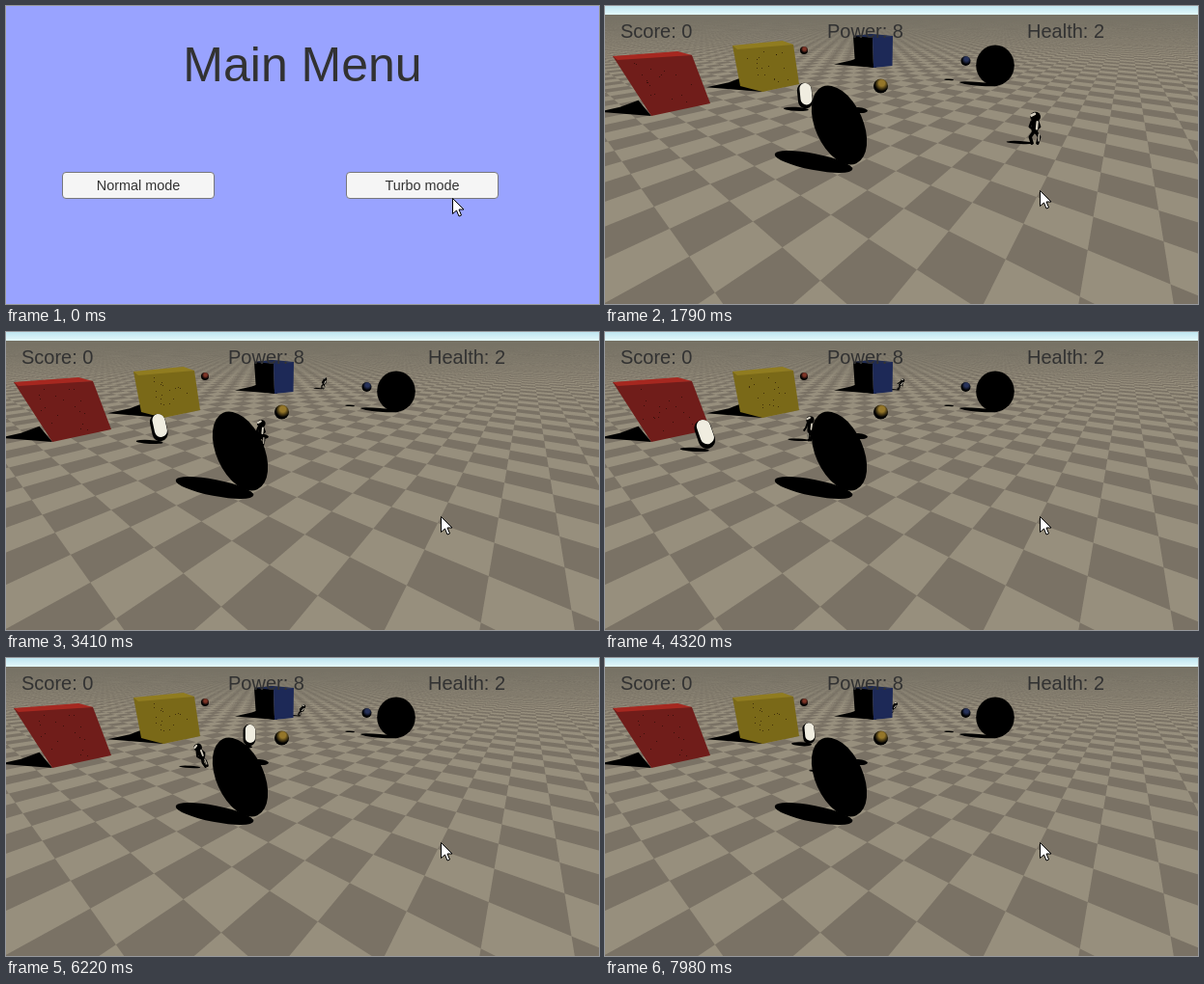
Animation of 614x309 px, one loop 8000 ms. Source, as an HTML page with a canvas:

```html
<!DOCTYPE html>
<html lang="en">
<head>
<meta charset="utf-8">
<title>Turbo mode</title>
<style>
  html, body { margin: 0; width: 100%; height: 100%; overflow: hidden; background: #99a3ff; }
  canvas { display: block; }
</style>
</head>
<body>
<canvas id="stage" width="614" height="309"></canvas>
<script>
const W = 614, H = 309, LOOP = 8000, GAME_START = 1298, STEP = 70.36, HORIZON = 10;
const ctx = document.getElementById('stage').getContext('2d');

const clamp01 = v => Math.min(1, Math.max(0, v));
const progress = (t, from, to) => clamp01((t - from) / (to - from));
const mix = (a, b, k) => a + (b - a) * k;

// Position on a path of [time, x, y] waypoints.
function along(path, t) {
  const next = Math.max(1, path.findIndex(p => p[0] > t));
  const i = t >= path[path.length - 1][0] ? path.length - 1 : next;
  const [t0, x0, y0] = path[i - 1], [t1, x1, y1] = path[i];
  const k = progress(t, t0, t1);
  return [mix(x0, x1, k), mix(y0, y1, k)];
}

function random(seed) {
  return () => (seed = (seed * 16807) % 2147483647) / 2147483647;
}

function text(string, x, y, size, align = 'left') {
  ctx.font = `${size}px "Liberation Sans", Arial, sans-serif`;
  ctx.textAlign = align;
  ctx.fillStyle = '#323232';
  ctx.fillText(string, x, y);
}

function poly(color, ...points) {
  ctx.beginPath();
  points.forEach(p => ctx.lineTo(...p));
  ctx.closePath();
  ctx.fillStyle = color;
  ctx.fill();
}

function oval(x, y, rx, ry, degrees = 0, color = '#000') {
  ctx.beginPath();
  ctx.ellipse(x, y, rx, ry, degrees * Math.PI / 180, 0, 2 * Math.PI);
  ctx.fillStyle = color;
  ctx.fill();
}

function pill(x, y, w, h, color) {
  ctx.beginPath();
  ctx.roundRect(x, y, w, h, w / 2);
  ctx.fillStyle = color;
  ctx.fill();
}

// ---- Menu ----

function button(label, x, shade) {
  ctx.beginPath();
  ctx.roundRect(x + .5, 172.5, 157, 27, 3.5);
  ctx.fillStyle = `rgb(${shade},${shade},${shade})`;
  ctx.fill();
  ctx.lineWidth = 1;
  ctx.strokeStyle = '#77777c';
  ctx.stroke();
  text(label, x + 79, 191, 14.4, 'center');
}

function drawMenu(t) {
  ctx.fillStyle = '#99a3ff';
  ctx.fillRect(0, 0, W, H);
  text('Main Menu', 307, 78, 50, 'center');
  button('Normal mode', 58, 245);
  button('Turbo mode', 352, mix(245, 214, progress(t, 830, 1170)));
}

function drawCursor(t) {
  const k = progress(Math.floor(t / 70) * 70, 0, 340);
  ctx.save();
  ctx.translate(Math.round(mix(462, 450, k)) + .5, Math.round(mix(199, 191, k)) + .5);
  ctx.lineWidth = 1;
  ctx.strokeStyle = '#000';
  poly('#fff', [0, 0], [0, 16], [4, 12.5], [6.5, 18.5], [9, 17.5], [6.5, 11.5], [11.5, 11.5]);
  ctx.stroke();
  ctx.restore();
}

// ---- Floor: a checkerboard seen through a tilted camera ----

function makeFloor() {
  const layer = document.createElement('canvas');
  layer.width = W;
  layer.height = H;
  const c = layer.getContext('2d'), image = c.createImageData(W, H);
  const focal = 268, cos = .881, sin = .473, tile = .2965, u0 = .36, v0 = -1.011, grid = 4;
  const light = [151, 143, 125], dark = [122, 114, 101], far = [119, 114, 101];
  for (let y = 9; y < H; y++) {
    const near = clamp01((y - 12) / 40);
    for (let x = 0; x < W; x++) {
      let lit = 0;
      for (let s = 0; s < grid * grid; s++) {
        const px = x + (s % grid + .5) / grid;
        const py = Math.max(y + (Math.floor(s / grid) + .5) / grid, HORIZON + .4);
        const drop = cos * (py - HORIZON);
        const gx = (px - W / 2) / drop, gz = (focal * cos - (py - H / 2) * sin) / drop;
        const u = Math.floor((gx * .609 + gz * .793 - u0) / tile);
        const v = Math.floor((gx * .793 - gz * .609 - v0) / tile);
        if ((u + v) % 2 === 0) lit++;
      }
      const i = (y * W + x) * 4;
      for (let k = 0; k < 3; k++) {
        image.data[i + k] = mix(far[k], mix(dark[k], light[k], lit / grid ** 2), near);
      }
      image.data[i + 3] = 255;
    }
  }
  c.putImageData(image, 0, 0);
  const sky = c.createLinearGradient(0, 0, 0, 9);
  sky.addColorStop(0, '#bfe6f0');
  sky.addColorStop(1, '#e4f8fb');
  c.fillStyle = sky;
  c.fillRect(0, 0, W, 9);
  return layer;
}
const floor = makeFloor();

// ---- Scene objects ----

function ball(x, y, r, color) {
  const glow = ctx.createRadialGradient(x + r * .15, y - r * .4, r * .4, x + r * .15, y - r * .3, r);
  glow.addColorStop(0, color);
  glow.addColorStop(1, '#000');
  oval(x, y, r, r, 0, glow);
}

// Shadow thrown to the left of a cube's nearest bottom corner.
function cubeShadow(x, y, reach) {
  poly('#000', [x, y], [x - reach, y - reach * .08], [x - reach * .6, y - reach * .17],
    [x - reach * .25, y - reach * .3]);
}

function cubeRoof(color, [x0, y0], [x1, y1]) {
  poly(color, [x0, y0], [mix(x0, x1, .82), y1 - 4], [x1, y1], [x0 + 5, y0 + 4]);
}

function specks(seed, x, y, size) {
  const rnd = random(seed);
  ctx.fillStyle = 'rgba(20,5,0,.55)';
  for (let i = 0; i < 18; i++) {
    const down = rnd();
    ctx.fillRect(Math.round(x + (rnd() + down * .4) * size), Math.round(y + down * size * .8), 1, 1);
  }
}

function cubes(frame) {
  cubeShadow(48, 114, 54);
  poly('#701d1a', [8, 52], [90, 51], [109, 101], [48, 114]);
  cubeRoof('#a62820', [8, 52], [90, 51]);
  specks(90 + frame % 5, 24, 59, 55);

  cubeShadow(163, 89, 58);
  poly('#7a6918', [132, 41], [195, 40], [201, 81], [163, 89], [140, 83]);
  cubeRoof('#907c20', [132, 41], [195, 40]);
  specks(40 + frame % 5, 143, 47, 40);

  cubeShadow(281, 64, 44);
  poly('#000', [257, 31], [277, 29], [278, 64], [259, 61]);
  poly('#1d2957', [277, 32], [298, 31], [297.5, 62], [278, 64]);
  poly('#202c52', [257, 31], [277, 29], [298, 31], [277, 33]);
}

function capsule(t) {
  const out = progress(t, 1790, 4320) ** 1.7;
  const [x, y] = t < 4320
    ? [mix(207, 103, out), mix(93, 106, out)]
    : along([[4320, 103, 106], [6220, 252, 80], [7980, 211, 78]], t);
  const h = (y - HORIZON) * .32, w = h * .57;
  oval(x - w * .6, y + h * .52, w * .85, 2, 3);
  ctx.save();
  ctx.translate(x, y);
  ctx.rotate((x - 252) * .13 * Math.PI / 180);
  pill(-w / 2, -h / 2, w, h, '#000');
  ctx.clip();
  pill(-w * .32, -h * .5, w * .8, h * .86, '#f0ede0');
  ctx.restore();
}

function walker(path, lean, t) {
  const [x, y] = along(path, t);
  const size = (y - HORIZON) * .29, swing = Math.sin(t / 110) * .13;
  oval(x - size * .45, y + size * .45, size * .42, size * .045, 3);
  ctx.save();
  ctx.translate(x, y);
  ctx.scale(size, size);
  ctx.rotate(lean * Math.PI / 180);
  ctx.lineCap = ctx.lineJoin = 'round';
  const limb = (color, width, ...points) => {
    ctx.beginPath();
    points.forEach(p => ctx.lineTo(...p));
    ctx.strokeStyle = color;
    ctx.lineWidth = width;
    ctx.stroke();
  };
  for (const side of [-1, 1]) {
    const stride = side * (.07 - swing);
    limb('#000', .1, [0, .08], [stride, .28], [stride * .6, .47]);
    limb('#000', .08, [side * .09, -.2], [side * .15, -.03], [side * (.09 + swing), .07]);
  }
  limb('#000', .2, [.01, -.18], [0, .08]);
  oval(.02, -.34, .16, .15);
  limb('#d2ccbd', .08, [-.1, -.38], [0, -.43]);
  limb('#d2ccbd', .07, [.08, -.18], [.06, .03]);
  limb('#aaa394', .05, [.06 - swing, .2], [.05 - swing, .4]);
  ctx.restore();
}

const walkerPath = [[1300, 525, 137], [2630, 308, 108], [4320, 212, 100], [6220, 202, 101], [7400, 235, 105]];
const farWalkerPath = [[1790, 404, 57], [2630, 349, 52], [4320, 306, 54], [6220, 306, 54], [7980, 299, 51]];

function drawGame(time) {
  const frame = Math.floor((time - GAME_START) / STEP + .1);
  const t = GAME_START + frame * STEP;
  ctx.drawImage(floor, 0, 0);

  ball(206, 46, 4, '#7d3426');
  walker(farWalkerPath, 28 * progress(t, 2630, 4320), t);
  cubes(frame);
  oval(356, 76.3, 5, .8, 4);
  oval(387, 80.8, 20, 1.9, 5);
  ball(373.5, 57, 5, '#27325a');
  oval(404, 61.5, 19.8, 21);

  oval(262, 108, 10, 3, 5);
  ball(285.5, 83, 7.5, '#94762a');
  capsule(t);
  walker(walkerPath, -26 * progress(t, 4320, 5000), t);

  oval(216, 161.5, 41, 8.5, 11);
  oval(242.5, 123.5, 43.5, 24.7, 66);

  text('Score: 0', 16, 33, 20);
  text('Power: 8', 230, 33, 20);
  text('Health: 2', 437, 33, 20);
}

function draw(ms) {
  const t = ms % LOOP;
  if (t < GAME_START) drawMenu(t);
  else drawGame(t);
  drawCursor(t);
}

let start;
function tick(now) {
  start ??= now;
  draw(now - start);
  requestAnimationFrame(tick);
}
requestAnimationFrame(tick);
</script>
</body>
</html>
```
